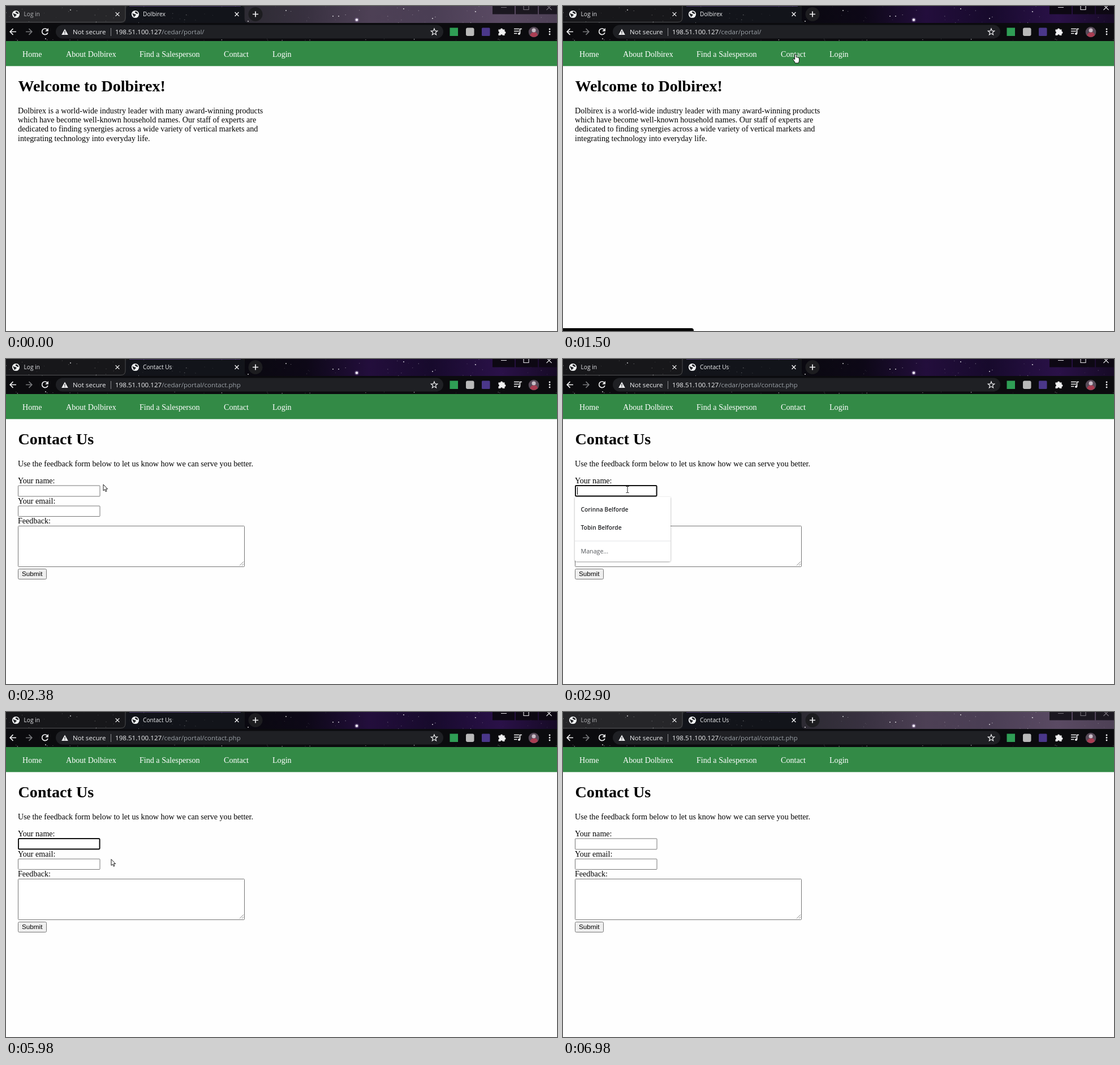
An HTML page for the animation above (8 s loop, 974 px wide and 575 px high).

```html
<!DOCTYPE html>
<html lang="en">
<head>
<meta charset="utf-8">
<title>Contact form</title>
<style>
html, body { margin: 0; width: 100%; height: 100%; overflow: hidden; background: #fefefe; }
svg { display: block; width: 100%; height: 100%; }
text { white-space: pre; }
.ui { font-family: "Open Sans", "Noto Sans", sans-serif; font-size: 11.6px; fill: #f1f2f4; }
.tab { font-size: 10.2px; }
.page { font-family: "Liberation Serif", "Times New Roman", serif; font-size: 14.1px; fill: #000; }
.nav { fill: #fff; }
.h1 { font-size: 28.15px; font-weight: bold; }
.form { font-family: "Liberation Sans", Arial, sans-serif; font-size: 11.72px; fill: #000; }
.field { fill: #fff; stroke: #767676; }
.line { fill: none; stroke: #f1f1f3; stroke-width: 1.7; }
.cursor { stroke: #000; stroke-width: .9; stroke-linejoin: round; fill: #fff; }
</style>
</head>
<body>
<svg viewBox="0 0 974 575" preserveAspectRatio="none">
  <defs>
    <linearGradient id="lit">
      <stop offset="0" stop-color="#0a0910"/><stop offset=".2" stop-color="#0d0817"/>
      <stop offset=".4" stop-color="#230e3c"/><stop offset=".6" stop-color="#170a2c"/>
      <stop offset=".82" stop-color="#2a1148"/><stop offset="1" stop-color="#160a25"/>
    </linearGradient>
    <linearGradient id="dim">
      <stop offset="0" stop-color="#2d2b33"/><stop offset=".2" stop-color="#383140"/>
      <stop offset=".4" stop-color="#4d4055"/><stop offset=".6" stop-color="#4a3e54"/>
      <stop offset=".82" stop-color="#5a4a63"/><stop offset="1" stop-color="#4d4055"/>
    </linearGradient>
    <linearGradient id="fade">
      <stop offset="0" stop-color="#12141a" stop-opacity="0"/><stop offset="1" stop-color="#12141a"/>
    </linearGradient>
    <clipPath id="title"><rect x="240" y="4" width="156" height="22"/></clipPath>
    <filter id="shadow" x="-10%" y="-10%" width="120%" height="125%">
      <feDropShadow dx="0" dy="1" stdDeviation="1.6" flood-opacity=".38"/>
    </filter>
    <g id="globe">
      <circle r="6.6" fill="#f1f3f4"/>
      <path d="M-5-2C-3-1-2 0 0 0C2 1 1 3-1 3C-1 5-2 5-3 4C-3 2-5 1-5-2ZM0-5C2-5 4-4 5-1C3 0 2-1 1-2C-1-2-1-3 0-5Z" fill="#202124"/>
    </g>
    <path id="cross" d="M-3.4-3.4L3.4 3.4M3.4-3.4L-3.4 3.4"/>
  </defs>

  <!-- tab strip -->
  <rect x="420" width="554" height="32" fill="url(#lit)" data-if="active"/>
  <rect x="420" width="554" height="32" fill="url(#dim)" data-if="!active"/>
  <rect width="422" height="32" fill="#17171a" data-if="active"/>
  <rect width="422" height="32" fill="#262629" data-if="!active"/>
  <rect y="30" width="974" height="32" fill="#0b0b0e"/>
  <path d="M0 28.5H203Q211 28.5 211 20V0" fill="none" stroke="#4b4c4f"/>
  <path d="M204 30Q212 30 212 22V6Q212 0 218 0H415Q421.500 0 421.500 6V22Q421.500 30 430 30Z" fill="#12141a"/>
  <path d="M218 .5H415" stroke="#4b3a6c"/>
  <g id="stars" fill="#fff"></g>
  <circle cx="620" cy="24.500" r="4" fill="#b79bd0" opacity=".3"/>
  <circle cx="620" cy="24.500" r="2.300" fill="#f6efff"/>

  <g fill="#1b1720" data-if="!active"><path d="M860 0h39v14.500h-39zM901 0h39v14.500h-39zM942 0h32v14.500h-32z"/></g>
  <g fill="#0d0813" data-if="active"><path d="M860 0h39v14.500h-39zM901 0h39v14.500h-39zM942 0h32v14.500h-32z"/></g>
  <g id="winIcons" fill="none" stroke-width="1.1">
    <path d="M875 2.500H885M915 0V6.500H924V0M955.500 7L964.500-2M964.500 7L955.500-2"/>
  </g>

  <use href="#globe" x="17.500" y="14.500"/>
  <text class="ui tab" id="tabOne" x="31.500" y="18.300">Log in</text>
  <use href="#cross" class="line" x="197" y="14.500" style="stroke-width:1.3"/>
  <g data-if="!loading"><use href="#globe" x="228.500" y="14.500"/></g>
  <path id="spinner" class="line" d="M-6 1.500A6.200 6.200 0 0 1 5.500-2.800" data-if="loading"/>
  <g clip-path="url(#title)">
    <text class="ui tab" id="tabTwo" x="242" y="18.300"></text>
    <rect x="376" y="4" width="20" height="22" fill="url(#fade)"/>
  </g>
  <use href="#cross" class="line" x="408" y="14.500" style="stroke-width:1.4"/>
  <circle cx="441" cy="14.500" r="12.500" fill="#1d1d20"/>
  <path class="line" d="M436 14.500H446M441 9.500V19.500"/>

  <!-- toolbar -->
  <rect x="88" y="33.500" width="685" height="24" rx="12" fill="#1f2024"/>
  <path class="line" d="M18 45.500H7.500M12.500 40.200L7.200 45.500L12.500 50.800"/>
  <path class="line" d="M35 45.500H45.500M40.500 40.200L45.800 45.500L40.500 50.800" style="stroke:#77787b"/>
  <g data-if="!loading">
    <path class="line" d="M73.300 42.200A5.300 5.300 0 1 0 74 47"/>
    <path d="M75 39V44.800H69.200Z" fill="#f1f1f3"/>
  </g>
  <path class="line" d="M63.800 40.500L73.800 50.500M73.800 40.500L63.800 50.500" data-if="loading"/>
  <path d="M104 40.500L109.800 51H98.200Z" fill="#f1f1f3"/>
  <path d="M104 44.300V47.500M104 48.600V49.800" stroke="#1f2024" stroke-width="1.200"/>
  <text class="ui" x="118" y="50">Not secure</text>
  <path d="M185.500 39V53" stroke="#8b8c90"/>
  <text class="ui" x="193" y="50">198.51.100.127<tspan id="path" fill="#9aa0a6"></tspan></text>
  <path class="line" id="bookmark" style="stroke-width:1.200"/>
  <rect x="784.500" y="38.500" width="14.500" height="14.500" fill="#2f9e55"/>
  <rect x="813" y="38.500" width="14.500" height="14.500" rx="3" fill="#b9b9b9"/>
  <rect x="841" y="38.500" width="14.500" height="14.500" rx="1.500" fill="#4a378a"/>
  <path d="M870.500 41.500H874A2 2 0 1 1 878 41.500H881.500V45A2 2 0 1 1 881.500 49V52H877.800A1.800 1.800 0 0 0 874.200 52H870.500V48.500A1.800 1.800 0 0 0 870.500 45Z" fill="#f1f1f3"/>
  <path class="line" d="M898 40.500H907M898 44.500H907M898 48.500H903.500M908.500 49V40.500H912"/>
  <circle cx="907" cy="49" r="2" fill="#f1f1f3"/>
  <circle cx="933" cy="46" r="9.300" fill="#574a58"/>
  <path d="M926 52Q929 46 933 47Q938 45 940 52Q933 58 926 52Z" fill="#aa3d52"/>
  <circle cx="933" cy="43" r="3.500" fill="#c8bcc6"/>
  <g fill="#f1f1f3"><circle cx="961" cy="41" r="1.400"/><circle cx="961" cy="45.500" r="1.400"/><circle cx="961" cy="50" r="1.400"/></g>

  <!-- page -->
  <rect y="62" width="974" height="513" fill="#fefefe"/>
  <rect y="62" width="974" height="44.300" fill="#338a46"/>
  <g class="page nav">
    <text x="29" y="90">Home</text><text x="106" y="90">About Dolbirex</text>
    <text x="236" y="90">Find a Salesperson</text><text x="385" y="90">Contact</text>
    <text x="471" y="90">Login</text>
  </g>
  <g class="page" data-if="!contact">
    <text class="h1" x="21.500" y="151">Welcome to Dolbirex!</text>
    <text x="21" y="190">Dolbirex is a world-wide industry leader with many award-winning products</text>
    <text x="21" y="206">which have become well-known household names. Our staff of experts are</text>
    <text x="21" y="222.300">dedicated to finding synergies across a wide variety of vertical markets and</text>
    <text x="21" y="238.500">integrating technology into everyday life.</text>
  </g>
  <g class="page" data-if="contact">
    <text class="h1" x="21.500" y="151">Contact Us</text>
    <text x="21" y="190">Use the feedback form below to let us know how we can serve you better.</text>
    <text x="21" y="220.300">Your name:</text>
    <text x="21" y="256.300">Your email:</text>
    <text x="21" y="291.300">Feedback:</text>
    <rect class="field" x="21.500" y="224" width="144.500" height="19" rx="1"/>
    <rect class="field" x="21.500" y="260" width="144.500" height="18.500" rx="1"/>
    <rect class="field" x="21.500" y="295.500" width="400" height="72" rx="1"/>
    <path d="M413 365.500L420 358.500M417 365.500L420 362.500" stroke="#777" stroke-width=".9"/>
    <rect x="21.500" y="371.500" width="50" height="18" rx="2" fill="#efefef" stroke="#767676"/>
    <text class="form" x="28" y="384.300">Submit</text>
    <rect x="22" y="224" width="143.500" height="18.500" rx="1.500" fill="#fff" stroke="#101010" stroke-width="1.900" data-if="focus"/>
    <text class="form" x="25" y="237.300" data-if="typed">MelK!62*drop</text>
    <rect id="caret" y="226.500" width="1" height="13.500" data-if="caret"/>
  </g>
  <g data-if="list">
    <path d="M21 244H190V355Q190 358 187 358H24Q21 358 21 355Z" fill="#fff" filter="url(#shadow)"/>
    <path d="M21 322H190" stroke="#e2e3e5"/>
    <g class="ui" style="font-size:10.300px;fill:#202124">
      <text x="31.500" y="270" font-weight="600">Corinna Belforde</text>
      <text x="31.500" y="302" font-weight="600">Tobin Belforde</text>
      <text x="31.500" y="344.300" style="fill:#55585c;font-size:10.700px">Manage...</text>
    </g>
  </g>
  <path id="status" data-if="status"/>

  <g class="cursor" id="arrow"><path d="M0 0V11L2.500 8.700L4.200 12.600L6 11.800L4.300 8H7.600Z"/></g>
  <g class="cursor" id="hand"><path d="M-1.300 9V1Q0-1 1.300 1V5.500Q2.600 4.600 3.200 6Q4.500 5.400 5 6.700Q6.600 6.300 6.600 8V11.500Q6.400 13.500 5.200 16H-.6Q-1.400 13.500-3.800 10.500Q-5 8.500-3.300 8.200Q-2.200 8.200-1.300 9.800Z"/></g>
  <g id="beam" fill="none" stroke="#222"><path d="M-2.500-5.500H-.7L0-5L.7-5.500H2.500M0-5V5M-2.500 5.500H-.7L0 5L.7 5.500H2.500"/></g>
</svg>

<script>
const LOOP = 8000;
const $ = id => document.getElementById(id);
const BASE = "/cedar/portal/";

// Each step changes part of the state at its time.
const steps = [
  [0, {}],
  [1000, { status: 231 }],
  [1380, { active: 1 }],
  [1510, { loading: 1, address: 1 }],
  [1770, { contact: 1, status: 321 }],
  [2000, { loading: 0 }],
  [2260, { status: 0 }],
  [2760, { focus: 1, caret: 25 }],
  [2900, { list: 1 }],
  [3390, { caret: 0 }],
  [3890, { caret: 25 }],
  [4150, { list: 0, typed: 1, caret: 95 }],
  [4640, { caret: 0 }],
  [5240, { caret: 95 }],
  [5620, { caret: 0 }],
  [5740, { typed: 0 }],
  [6250, { caret: 25 }],
  [6730, { focus: 0, caret: 0, active: 0 }]
];

// time, pointer shape, hot spot
const moves = [
  [0, ""],
  [130, "arrow", 769, 490], [250, "arrow", 735, 430], [380, "arrow", 672, 328],
  [500, "arrow", 595, 218], [630, "arrow", 524, 132], [750, "hand", 470, 88],
  [880, "hand", 426, 69], [1000, "hand", 415, 80], [1130, "hand", 411, 85],
  [1770, "hand", 406, 92], [1890, "hand", 397.5, 106.5], [2000, "arrow", 378, 119],
  [2140, "arrow", 322, 152], [2260, "arrow", 238, 194], [2380, "arrow", 172, 222],
  [2500, "beam", 128, 232], [2650, "beam", 114, 231],
  [5980, "arrow", 186, 260.5], [6130, "arrow", 480, 375], [6250, "arrow", 949, 556],
  [6380, ""]
];

const conditional = [...document.querySelectorAll("[data-if]")].map(el => {
  const key = el.dataset.if;
  return { el, key: key.replace("!", ""), not: key[0] === "!" };
});
const show = (el, on) => { el.style.display = on ? "" : "none"; };

function drawStars() {
  let seed = 41;
  const rnd = () => (seed = seed * 16807 % 2147483647) / 2147483647;
  const dot = (x, y, r, o) =>
    `<circle cx="${x}" cy="${y}" r="${r}" opacity="${o}"/>`;
  let out = "";
  for (let i = 0; i < 85; i++)
    out += dot(rnd() * 974, rnd() * 30, .3 + rnd() * .4, .15 + rnd() * .4);
  for (let i = 0; i < 22; i++)
    out += dot(rnd() * 974, 58 + rnd() * 3, .4 + rnd() * .4, .3 + rnd() * .4);
  for (const [x, y] of [[495, 8], [578, 18], [588, 18], [703, 5], [754, 22], [830, 10], [428, 27], [114, 7], [70, 58]])
    out += dot(x, y, .9, .85);
  $("stars").innerHTML = out;
}

function drawBookmark() {
  const points = Array.from({ length: 10 }, (_, i) => {
    const a = i * Math.PI / 5, r = i % 2 ? 2.6 : 6;
    return `${757 + r * Math.sin(a)} ${46 - r * Math.cos(a)}`;
  });
  $("bookmark").setAttribute("d", `M${points.join("L")}Z`);
}

function render(t) {
  const s = Object.assign({}, ...steps.filter(([at]) => at <= t).map(([, change]) => change));
  for (const { el, key, not } of conditional) show(el, !!s[key] !== not);

  $("tabOne").style.fill = s.active ? "#e4e5e8" : "#b4b5b8";
  $("winIcons").setAttribute("stroke", s.active ? "#e8e6ea" : "#77727b");
  $("tabTwo").textContent = s.loading ? "https://198.51.100.127" + BASE
    : s.contact ? "Contact Us" : "Dolbirex";
  $("path").textContent = BASE + (s.address ? "contact.php" : "");
  $("spinner").setAttribute("transform",
    `translate(229 14.5) rotate(${Math.floor((t - 1890) / 120) * 50})`);
  $("caret").setAttribute("x", s.caret || 0);
  $("status").setAttribute("d", `M0 570H${(s.status || 0) - 4}q4 0 4 4V575H0Z`);
  $("status").setAttribute("fill", s.active ? "#050505" : "#2b2b2d");

  const [, shape, x, y] = moves.filter(([at]) => at <= t).pop();
  for (const id of ["arrow", "hand", "beam"]) show($(id), id === shape);
  if (shape) $(shape).setAttribute("transform", `translate(${x} ${y})`);
}

drawStars();
drawBookmark();
const start = performance.now();
function tick() {
  render((performance.now() - start) % LOOP);
  requestAnimationFrame(tick);
}
tick();
</script>
</body>
</html>
```
